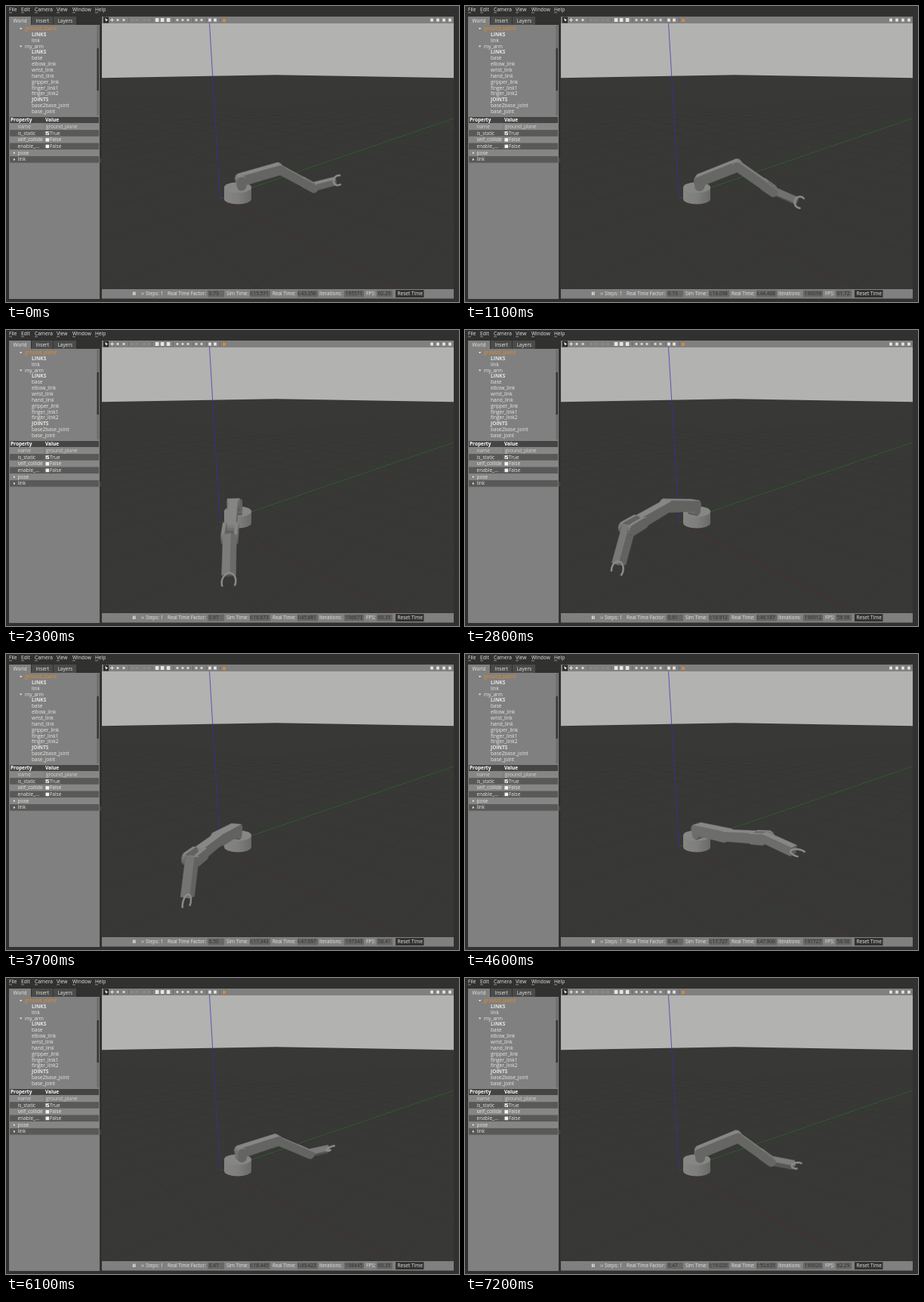
Animation of 600 by 392 pixels, one loop 7500 ms. Source, as an HTML page with a canvas:

```html
<!DOCTYPE html>
<html lang="en">
<head>
<meta charset="utf-8">
<title>Robot arm simulation</title>
<style>
  html, body { margin: 0; width: 100%; height: 100%; overflow: hidden; background: #31312f; }
  canvas { display: block; }
</style>
</head>
<body>
<canvas id="stage" width="600" height="392"></canvas>
<script>
const ctx = document.getElementById('stage').getContext('2d');
const { PI, sin, cos, max, min, floor, hypot } = Math;
const LOOP = 7500, INK = '#e6e6e4', PANEL = '#808080';

// Key poses: time, then degrees of yaw, upper arm, forearm and hand pitch, gripper roll.
const poses = [
  [0, 15, 12, -32, 9, 0],
  [900, 8, 22, -38, -20, 20],
  [1900, -54, 22, -20, -38, 45],
  [2800, -118, 17, -5, -63, 90],
  [3700, -104, 7, 2, -68, 180],
  [4500, -43, 5, 12, -7, 270],
  [6000, 25, 10, -28, 3, 315],
  [7200, 8, 21, -38, -14, 325]
];
const UPPER = 52, FOREARM = 58, HAND = 34;

// Smooth curve through the key poses, in radians.
function poseAt(t) {
  const last = poses.length - 1;
  const i = min(poses.findLastIndex(p => p[0] <= t), last - 1);
  const a = poses[i], b = poses[i + 1], span = b[0] - a[0], f = (t - a[0]) / span;
  const slope = (j, c) => {
    const p = poses[max(j - 1, 0)], q = poses[min(j + 1, last)];
    return (q[c] - p[c]) / (q[0] - p[0]) * span;
  };
  const ease = f * f * (3 - 2 * f);
  return a.slice(1).map((v, j) => (v + (b[j + 1] - v) * ease
    + slope(i, j + 1) * f * (1 - f) ** 2 - slope(i + 1, j + 1) * f * f * (1 - f)) * PI / 180);
}

// World space is [right, away, up] from the foot of the base; the camera looks 15 degrees down.
const FOCUS = 403, EYE = [53, -374.5, 159.4], LIGHT = [-.25, .1, .96];
const dot = (a, b) => a.reduce((sum, v, i) => sum + v * b[i], 0);
const toEye = p => EYE.map((v, i) => v - p[i]);

function project([r, f, u]) {
  const k = FOCUS / (FOCUS + .966 * f - .259 * u);
  return [360 + (r - 53) * k, 199 + (57 - .966 * u - .259 * f) * k];
}

const turn = (axes, x, y, z) => [0, 1, 2].map(i => axes[0][i] * x + axes[1][i] * y + axes[2][i] * z);
const place = (frame, x, y, z = 0) => turn(frame.axes, x, y, z).map((v, i) => v + frame.origin[i]);

function capsule(from, to, r, points) {
  return Array.from({ length: points }, (_, i) => {
    const a = (i + .5) / points * PI * 2;
    return [(cos(a) > 0 ? to : from) + r * cos(a), r * sin(a)];
  });
}

// Extrudes an outline sideways and keeps the faces turned to the camera.
function prism(frame, outline, width, offset = 0) {
  const z1 = offset - width / 2, z2 = offset + width / 2;
  const faces = [z1, z2].map((z, i) =>
    ({ points: outline.map(([x, y]) => place(frame, x, y, z)), normal: turn(frame.axes, 0, 0, i * 2 - 1) }));
  outline.forEach(([x, y], i) => {
    const [p, q] = outline[(i + 1) % outline.length], len = hypot(p - x, q - y);
    faces.push({
      points: [place(frame, x, y, z1), place(frame, p, q, z1), place(frame, p, q, z2), place(frame, x, y, z2)],
      normal: turn(frame.axes, (q - y) / len, (x - p) / len, 0)
    });
  });
  const mid = outline.reduce((sum, p) => sum + p[0], 0) / outline.length;
  return {
    distance: hypot(...toEye(place(frame, mid, 0, offset))),
    faces: faces.filter(f => dot(f.normal, toEye(f.points[0])) > 0)
  };
}

function arm(t) {
  const [yaw, a1, a2, a3, roll] = poseAt(t);
  const side = [-sin(yaw), cos(yaw), 0];
  const dir = a => [cos(yaw) * cos(a), sin(yaw) * cos(a), sin(a)];
  const limb = (origin, a) => ({ origin, axes: [dir(a), dir(a + PI / 2), side] });

  const upper = limb([5 * cos(yaw), 5 * sin(yaw), 27], a1);
  const fore = limb(place(upper, UPPER, 0), a2);
  const hand = limb(place(fore, FOREARM, 0), a3);
  hand.axes = [hand.axes[0], turn(hand.axes, 0, cos(roll), sin(roll)), turn(hand.axes, 0, -sin(roll), cos(roll))];

  const solids = [
    prism(limb(upper.origin, PI / 2), capsule(-7, 0, 6, 12), 12),
    prism(upper, capsule(0, UPPER, 7, 12), 13),
    prism(fore, capsule(0, 44, 6, 12), 10),
    prism(fore, capsule(44, FOREARM, 6, 12), 3, -6),
    prism(fore, capsule(44, FOREARM, 6, 12), 3, 6),
    prism(hand, capsule(2, HAND - 4, 6.5, 4), 9)
  ];
  solids.sort((a, b) => b.distance - a.distance);
  solids.flatMap(s => s.faces).forEach(({ points, normal }) => {
    const v = 106 + 30 * dot(normal, LIGHT);
    poly(`rgb(${v},${v},${v - 2})`, ...points.flatMap(project));
    ctx.strokeStyle = ctx.fillStyle;
    ctx.lineWidth = .5;
    ctx.stroke();
  });

  ctx.beginPath();
  for (let a = 1; a < PI * 2 - 1; a += .2) {
    ctx.lineTo(...project(place(hand, HAND + 6 + 7.5 * cos(a), 7.5 * sin(a))));
  }
  ctx.strokeStyle = '#8a8a88';
  ctx.lineWidth = 2.5;
  ctx.stroke();
}

function rect(x, y, w, h, color) {
  ctx.fillStyle = color;
  ctx.fillRect(x, y, w, h);
}

function poly(color, ...p) {
  ctx.fillStyle = color;
  ctx.beginPath();
  for (let i = 0; i < p.length; i += 2) ctx.lineTo(p[i], p[i + 1]);
  ctx.closePath();
  ctx.fill();
}

function line(x1, y1, x2, y2, color, width = 1) {
  ctx.strokeStyle = color;
  ctx.lineWidth = width;
  ctx.beginPath();
  ctx.moveTo(x1, y1);
  ctx.lineTo(x2, y2);
  ctx.stroke();
}

function text(s, x, y, color = INK, weight = 400, size = 6.5) {
  ctx.font = `${weight} ${size}px "Open Sans", sans-serif`;
  ctx.textBaseline = 'middle';
  ctx.fillStyle = color;
  ctx.fillText(s, x, y + .3);
}

function clipped(x, y, w, h, draw) {
  ctx.save();
  ctx.beginPath();
  ctx.rect(x, y, w, h);
  ctx.clip();
  draw();
  ctx.restore();
}

function menuAndTabs() {
  rect(0, 0, 600, 392, '#31312f');
  [['File', 4], ['Edit', 20], ['Camera', 38], ['View', 67], ['Window', 88], ['Help', 118]].forEach(([s, x]) => {
    text(s, x, 5, INK, 400, 6.6);
    rect(x, 8.6, 4, .6, '#c8c8c6');
  });
  rect(4, 25, 120, 363, PANEL);
  [['World', 4, 29, PANEL], ['Insert', 34, 28, '#4b4b4a'], ['Layers', 63, 30, '#4b4b4a']].forEach(([s, x, w, c]) => {
    rect(x, 14, w, 11, c);
    text(s, x + 5.5, 19.7);
  });
}

function tree() {
  const rows = ['ground_plane', 'LINKS', 'link', 'my_arm', 'LINKS', 'base', 'elbow_link', 'wrist_link',
    'hand_link', 'gripper_link', 'finger_link1', 'finger_link2', 'JOINTS', 'base2base_joint', 'base_joint'];
  clipped(4, 26, 116, 119, () => rows.forEach((s, i) => {
    const y = 30 + i * 7.85, top = i === 0 || i === 3, head = s === s.toUpperCase();
    text(s, top ? 25 : 34, y, i ? INK : '#e8871e', head ? 700 : 400, 6.6);
    if (top) poly(INK, 18, y - 1, 21.4, y - 1, 19.7, y + 1.2);
  }));
  rect(120.5, 26, 2.5, 119, '#6c6c6b');
  rect(120.5, 56, 2.5, 56, '#353534');
}

function properties() {
  rect(5, 147, 118, 8, '#454544');
  text('Property', 6, 151.2, '#fff', 700);
  text('Value', 52, 151.2, '#fff', 700);
  const rows = [['name', 'ground_plane'], ['is_static', 'True'], ['self_collide', 'False'],
    ['enable_…', 'False'], ['pose'], ['link']];
  rows.forEach(([name, value], i) => {
    const y = 155.4 + i * 8.7, mid = y + 4.4, color = i ? INK : '#d0d0ce';
    rect(5, y, 118, 8.7, i % 2 ? '#595958' : '#868686');
    text(name, 15.5, mid, color);
    if (!value) return poly(INK, 10, mid - 1.7, 12.3, mid, 10, mid + 1.7);
    rect(50.5, y, .5, 8.7, '#6f6f6e');
    text(value, i ? 58 : 53, mid, color);
    if (i) rect(52.5, mid - 2.3, 4.6, 4.6, '#f4f4f2');
    if (value === 'True') {
      line(53.3, mid, 54.5, mid + 1.2, '#222', .8);
      line(54.5, mid + 1.2, 56.5, mid - 1.5, '#222', .8);
    }
  });
  [202, 204, 206].forEach(y => rect(125, y, 1, 1, '#777'));
}

function toolbar() {
  const y = 18.5;
  rect(127, 14, 466, 9, PANEL);
  rect(129, 14.5, 7, 8, '#2c2c2b');
  poly(INK, 131, 16, 135, 18.5, 132.3, 20.5);
  line(138, y, 143, y, INK);
  line(140.5, 16, 140.5, 21, INK);
  [166, 172, 182, 188].forEach(x => rect(x, 18, 2.5, .8, '#a2a2a0'));
  [162, 193, 221, 247, 265, 283].forEach(x => rect(x, 15.5, .5, 6, '#5c5c5b'));
  [200, 207, 215].forEach(x => rect(x - 2.2, 16, 4.6, 5, INK));
  [148, 156, 227, 234, 241, 252, 259].forEach(x => rect(x - 1.4, 17, 2.8, 3, '#d4d4d2'));
  [270, 277, 564, 572, 580, 588].forEach(x => rect(x - 1.8, 16.6, 3.6, 4, INK));
  rect(287.2, 17, 3.6, 4, '#dd8a30');
}

function world() {
  rect(127, 23, 466, 352, '#383836');
  poly('#b2b2b0', 127, 23, 593, 23, 593, 95.2, 357, 91.2, 127, 95.2);
  clipped(127, 118, 466, 257, () => {
    for (let x = -700; x < 1300; x += 110) {
      for (const vanish of [760, -32]) {
        line(vanish, 92, vanish + (x - vanish) * 1.8, 385, 'rgba(20,20,20,.08)', .7);
      }
    }
  });
  line(283.5, 255, 593, 149, '#2a612b', .9);
  line(283.5, 255, 517, 375, '#50302e', .9);
  line(269.5, 23, 283.5, 255, '#3330b4', .7);
}

function base() {
  const side = ctx.createLinearGradient(289, 0, 326, 0);
  side.addColorStop(0, '#858583');
  side.addColorStop(.5, '#7e7e7c');
  side.addColorStop(1, '#686866');
  const disc = (y, from, to) => ctx.ellipse(307, y, 18, 7, 0, from, to);
  ctx.beginPath();
  disc(255.5, 0, PI);
  disc(240.5, PI, PI * 2);
  ctx.fillStyle = side;
  ctx.fill();
  ctx.beginPath();
  disc(240.5, 0, PI * 2);
  ctx.fillStyle = '#868684';
  ctx.fill();
}

function statusBar(t) {
  const seconds = ms => (ms / 1000).toFixed(3).padStart(6, '0');
  const steps = Math.round(195571 + .479 * t);
  const factor = .47 + .26 / (1 + Math.exp((t - 2850) / 430));
  const rate = 60.35 + 1.94 * cos(floor(t / 900) / 8 * PI * 2);
  rect(127, 375, 466, 12.5, PANEL);
  [168, 170.2].forEach(x => rect(x, 378.5, 1.2, 4.5, '#f2f2f0'));
  rect(179.5, 379, .7, 4, '#b5b5b3');
  poly('#b5b5b3', 181, 379, 183, 381, 181, 383);
  text('Steps: 1', 185, 381, INK, 400, 6.4);
  const fields = [
    ['Real Time Factor:', 214, 267, 22, factor.toFixed(2)],
    ['Sim Time:', 292, 323, 27, '3:' + seconds(steps - 180000)],
    ['Real Time:', 353, 386, 27, '4:' + seconds(43356 + 1.011 * t)],
    ['Iterations:', 415, 448, 26, String(steps)],
    ['FPS:', 477, 491, 21, rate.toFixed(2)]
  ];
  fields.forEach(([label, x, box, w, value]) => {
    text(label, x, 381, INK, 400, 6.4);
    rect(box, 376.5, w, 9, '#676766');
    clipped(box + 1, 376, w - 1, 10, () =>
      text(value, value.includes(':') ? box - 1 : box + 1.8, 381, '#2c2c2b'));
  });
  rect(516, 376, 37.5, 10, '#333332');
  text('Reset Time', 518.5, 381);
}

function draw(now) {
  const time = now % LOOP, step = time < 4500 ? 100 : 300;
  const t = min(floor(time / step) * step, 7200);
  menuAndTabs();
  tree();
  properties();
  toolbar();
  world();
  base();
  arm(t);
  statusBar(t);
}

const start = performance.now();
(function frame() {
  draw(performance.now() - start);
  requestAnimationFrame(frame);
})();
</script>
</body>
</html>
```
